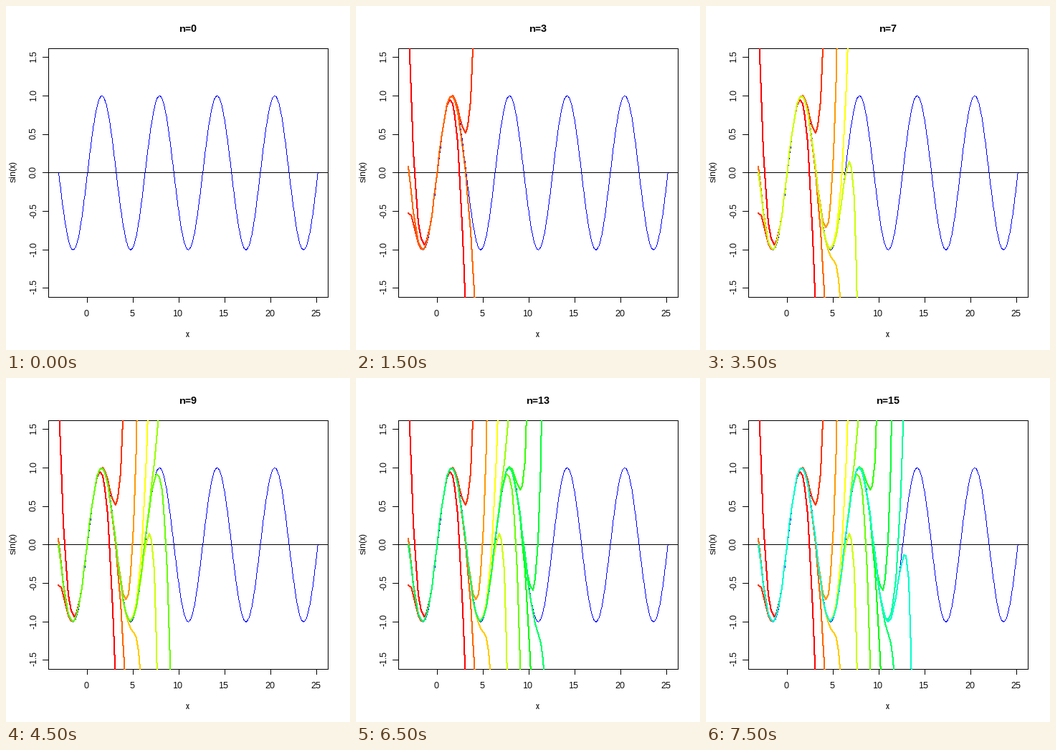
Animation of 480x480 px, one loop 8000 ms. Source, as a matplotlib script:

```python
import math
import colorsys

import numpy as np
import matplotlib as mpl
import matplotlib.pyplot as plt
from matplotlib.animation import FuncAnimation
from matplotlib.collections import PolyCollection
from matplotlib.patches import Rectangle

mpl.rcParams.update({
    "font.family": "Liberation Sans",
    "font.size": 12,
    "text.hinting": "native",
    "text.hinting_factor": 1,
    "toolbar": "None",
})

SIZE, DPI = 480, 72
FRAMES, INTERVAL = 16, 500
HUES = 30

# Plot region in pixels, y pointing down
LEFT, RIGHT, TOP, BOTTOM = 59.04, 449.76, 59.04, 406.56
X0, X1 = -math.pi, 8 * math.pi
PAD = 0.04 * (X1 - X0)
Y_MAX = 1.5 * 1.08


def px(x):
    return np.floor(LEFT + (x - X0 + PAD) / (X1 - X0 + 2 * PAD) * (RIGHT - LEFT))


def py(y):
    return np.floor((TOP + BOTTOM) / 2 - y / (2 * Y_MAX) * (BOTTOM - TOP))


def taylor(x, order):
    """Series of sin(x) up to the power 2 * order + 1."""
    return sum((-1) ** k * x ** (2 * k + 1) / math.factorial(2 * k + 1)
               for k in range(order + 1))


def trace(xs, ys):
    """Pixels along a polyline, one per step of each segment's longer side."""
    points = []
    for x0, y0, x1, y1 in zip(xs, ys, xs[1:], ys[1:]):
        dx, dy = x1 - x0, y1 - y0
        if abs(dy) > abs(dx):
            y = np.arange(max(min(y0, y1), 50), min(max(y0, y1), 416) + 1)
            x = x0 + (y - y0) * dx / dy
        else:
            x = np.arange(x0, x1 + 1)
            y = y0 + (x - x0) * dy / max(dx, 1)
        points.append(np.column_stack([x, y]))
    return np.unique(np.floor(np.vstack(points) + 0.5), axis=0)


fig = plt.figure(figsize=(SIZE / DPI, SIZE / DPI), dpi=DPI, facecolor="white")
ax = fig.add_axes([0, 0, 1, 1])
ax.set_xlim(0, SIZE)
ax.set_ylim(SIZE, 0)
ax.axis("off")

region = Rectangle((59, 59), 391, 348, transform=ax.transData)
PIXEL = np.array([[0, 0], [1, 0], [1, 1], [0, 1]])


def draw_curve(x, y, color, width, z):
    """Crisp curve drawn with a square pen."""
    pen = PIXEL * width - width // 2
    squares = trace(px(x), py(y))[:, None, :] + pen
    curve = PolyCollection(squares, facecolors=[color], edgecolors="none",
                           linewidths=0, antialiaseds=False, zorder=z)
    ax.add_collection(curve, autolim=False)
    curve.set_clip_path(region)
    return curve


def rule(xs, ys):
    ax.plot(np.add(xs, 0.5), np.add(ys, 0.5), color="black", lw=1,
            antialiased=False, snap=False, solid_capstyle="projecting",
            solid_joinstyle="miter", zorder=2)


def label(x, y, text, rotation=0, **style):
    return ax.text(x, y, text, rotation=rotation, rotation_mode="anchor",
                   ha="center", va="baseline", **style)


x = np.linspace(X0, X1, 1001)
draw_curve(x, np.sin(x), (0, 0, 1), width=1, z=1)
rule([59, 449], [py(0)] * 2)
rule([59, 449, 449, 59, 59], [59, 59, 406, 406, 59])

for v in range(0, 26, 5):
    rule([px(v)] * 2, [406, 413])
    label(px(v) - 1, 433, str(v))

for v in np.arange(-1.5, 1.6, 0.5):
    rule([51, 59], [py(v)] * 2)
    label(42, py(v) - 1, f"{v:.1f}", rotation=90)

label(253, 462, "x")
label(14, 231.5, "sin(x)", rotation=90)
title = label(253.4, 36, "", fontsize=14, fontweight="bold")

x = np.linspace(X0, X1, 101)
curves = [draw_curve(x, taylor(x, n), colorsys.hsv_to_rgb((n - 1) / HUES, 1, 1),
                     width=2, z=3 + n)
          for n in range(1, FRAMES)]


def update(n):
    title.set_text(f"n={n}")
    for order, curve in enumerate(curves, start=1):
        curve.set_visible(order <= n)
    return [title, *curves]


anim = FuncAnimation(fig, update, frames=FRAMES, init_func=lambda: update(0),
                     interval=INTERVAL, repeat=True, repeat_delay=0, blit=False)

plt.show()
```
